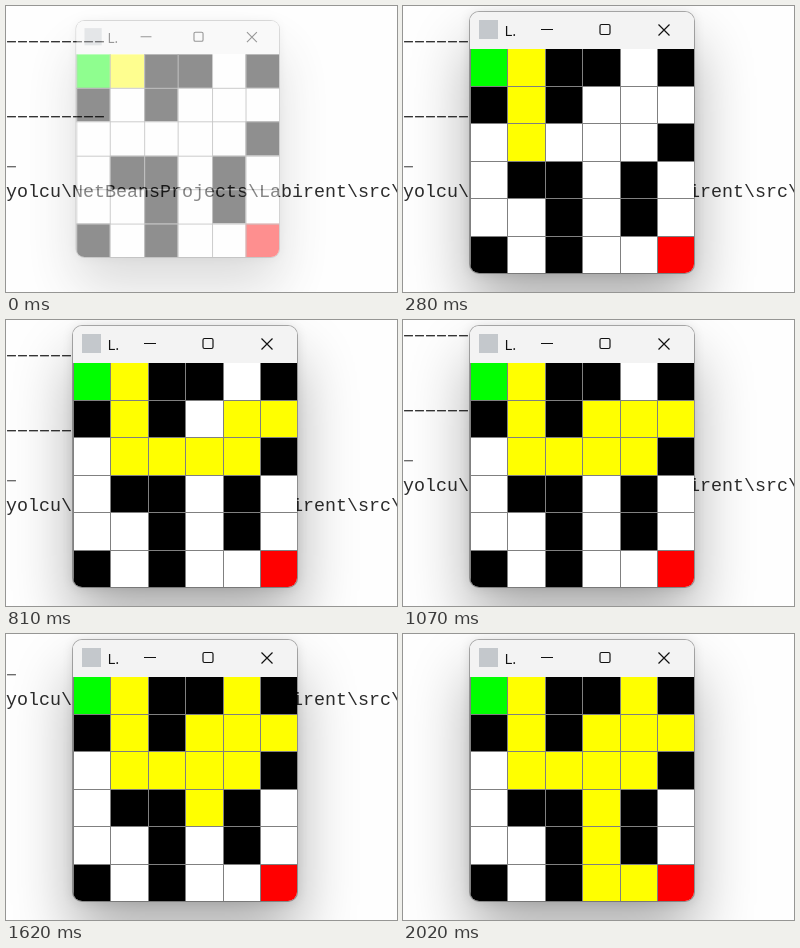
These frames come from a looping animation (391 by 286 pixels, 2.56 s). An HTML page:

```html
<!DOCTYPE html>
<html lang="tr">
<head>
<meta charset="utf-8">
<title>Labirent</title>
<style>
  html, body { margin: 0; width: 100%; height: 100%; overflow: hidden; background: #fefefe; }
  svg { display: block; }
  #stage { position: relative; width: 391px; height: 286px; overflow: hidden; }
  #console { font: 18.33px "Liberation Mono", "Courier New", monospace; fill: #2c2c2c; white-space: pre; }
  #win {
    position: absolute; left: 67px; top: 6px; width: 224px; height: 261px;
    border-radius: 9px;
    box-shadow: 0 0 0 1px rgba(0,0,0,.3), 0 1px 12px rgba(0,0,0,.12), 0 34px 60px rgba(0,0,0,.32);
  }
  #win svg { border-radius: 9px; }
  #win text { font: 15px "Open Sans", "Noto Sans", sans-serif; }
</style>
</head>
<body>
<div id="stage">
  <svg width="391" height="286">
    <g id="console">
      <text x="0" y="42">−−−−−−−−−</text>
      <text x="0" y="117">−−−−−−−−−</text>
      <text x="0" y="167" fill="#666">−</text>
      <text x="0" y="191">yolcu\NetBeansProjects\Labirent\src\</text>
    </g>
  </svg>
  <div id="win">
    <svg width="224" height="261" viewBox="67 6 224 261">
      <rect x="67" y="6" width="224" height="37" fill="#f3f3f3"/>
      <rect x="76" y="14" width="19" height="19" fill="#c4c8cc"/>
      <text x="101.5" y="30" fill="#111">L.</text>
      <g fill="none" stroke="#111" stroke-width="1.2">
        <path d="M138 23.5h12M255.5 18.5l11 11m0-11l-11 11"/>
        <rect x="197" y="18.5" width="10" height="10" rx="1.5"/>
      </g>
      <g id="cells"></g>
      <path id="lines" stroke="#808080"/>
    </svg>
  </div>
</div>
<script>
const LOOP = 2560;
const TICK = 135;            // screen refresh, ms
const STEPS_PER_TICK = 1.25; // search speed
const SIZE = 6, PITCH = 37.5;
const maze = ["S.##.#", "#.#...", ".....#", ".##.#.", "..#.#.", "#.#..E"];
const colors = { S: "#00ff00", E: "#ff0000", "#": "#000", ".": "#fff" };
const visitColor = "#ffff00";

const $ = id => document.getElementById(id);
const edgeX = c => Math.floor(67 + c * PITCH);
const edgeY = r => Math.floor(42.5 + r * PITCH);

// Depth-first search: records the step at which each cell is entered;
// backing out of a cell also costs a step.
function solve() {
  const entered = new Map();
  let step = -1;
  function walk(r, c) {
    const key = r * SIZE + c;
    const kind = maze[r]?.[c];
    if (!kind || kind === "#" || entered.has(key)) return false;
    entered.set(key, step++);
    if (kind === "E") return true;
    if (walk(r, c + 1) || walk(r + 1, c) || walk(r, c - 1) || walk(r - 1, c)) return true;
    step++;
    return false;
  }
  walk(0, 0);
  return entered;
}

function addCell(kind, r, c) {
  const rect = document.createElementNS("http://www.w3.org/2000/svg", "rect");
  const box = { x: edgeX(c), y: Math.max(43, edgeY(r)), width: 38, height: 38 };
  for (const key in box) rect.setAttribute(key, box[key]);
  $("cells").appendChild(rect);
  return { rect, kind, step: entered.get(r * SIZE + c) };
}

const entered = solve();
const cells = maze.flatMap((row, r) => [...row].map((kind, c) => addCell(kind, r, c)));

let grid = "M67.5 43V267";
for (let i = 1; i < SIZE; i++) {
  grid += `M${edgeX(i) + 0.5} 43V267M67 ${edgeY(i) + 0.5}H291`;
}
$("lines").setAttribute("d", grid);

function draw(t) {
  const tick = Math.floor((t + 10) / TICK);

  const step = Math.floor(tick * STEPS_PER_TICK + 0.125);
  for (const { rect, kind, step: at } of cells) {
    rect.setAttribute("fill", kind === "." && at <= step ? visitColor : colors[kind]);
  }

  // The console starts to scroll, two lines at a time, once it is full.
  const prints = Math.max(0, Math.floor(0.62 * (tick - 8) + 1));
  $("console").setAttribute("transform", `translate(0 ${Math.min(0, 30 - 50 * prints)})`);

  // The window eases in over the first ticks.
  const lag = tick < 2 ? 0.06 ** tick : 0;
  const { style } = $("win");
  style.transform = lag ? `translate(${-7.3 * lag}px, ${-3.5 * lag}px) scale(${1 - 0.095 * lag})` : "none";
  style.opacity = 1 - 0.57 * lag;
}

const start = performance.now();
function tickFrame() {
  draw((performance.now() - start) % LOOP);
  requestAnimationFrame(tickFrame);
}
tickFrame();
</script>
</body>
</html>
```
